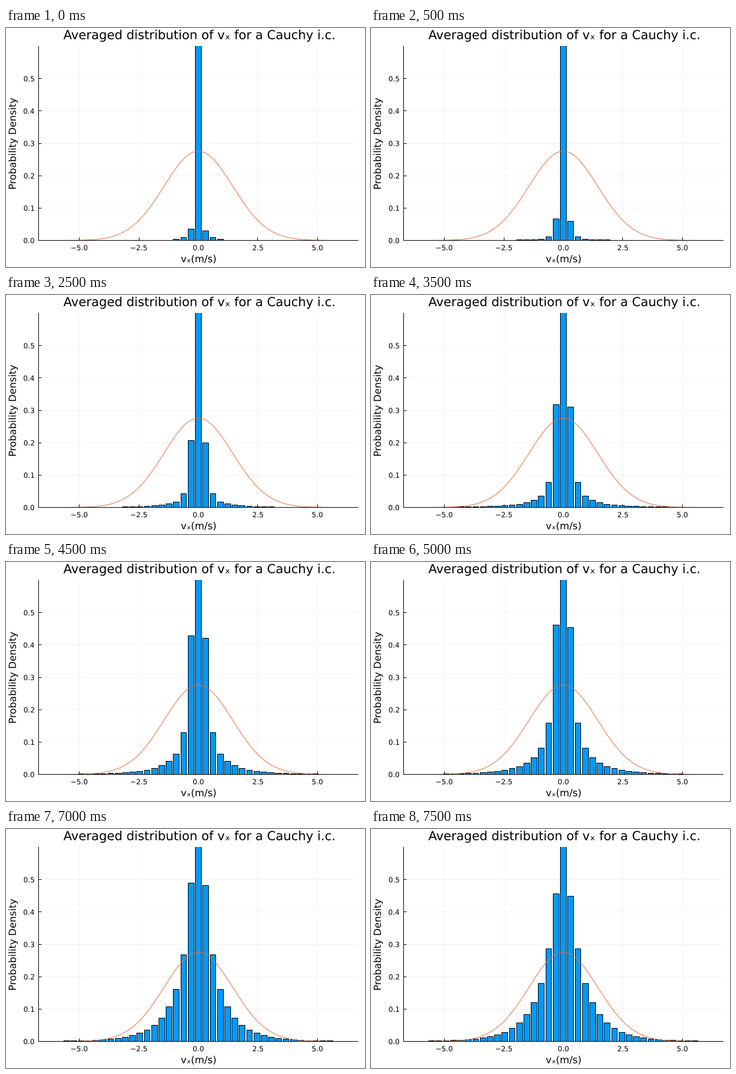
These frames come from a looping animation (600x400 px, 8000 ms). A matplotlib script:

```python
import numpy as np
import matplotlib.pyplot as plt
from matplotlib.animation import FuncAnimation
from matplotlib.patches import PathPatch
from matplotlib.textpath import TextPath
from matplotlib.transforms import Affine2D

W, H, DPI = 600, 400, 100
FRAMES, INTERVAL = 16, 500
LEFT, RIGHT, TOP, BOTTOM = 54.4, 587.6, 30.1, 355.1
MID_X, MID_Y = (LEFT + RIGHT) / 2, (TOP + BOTTOM) / 2
X_MAX, Y_MAX = 6.7, 0.6
STEP = 0.307           # bin spacing
SIGMA = 1.445          # width of the thermal curve
COUNT = 0.003          # density of one sample in a single run
PX = 72 / DPI          # one pixel in points
BINS = np.arange(-19, 20)


def heights(step):
    """Histogram after averaging step + 1 runs."""
    k = np.abs(BINS)
    first = np.interp(step, [0, 3, 5, 9, 11, 12.5, 14, 15],
                      [.033, .126, .203, .425, .49, .505, .486, .452])
    second = .34 / (1 + np.exp(-.36 * (step - 10.35)))
    # Stretched exponential tail, flattening as the runs relax.
    rate = 1.11 - .043 * step
    power = .6 + .0013 * step**2
    h = second * np.exp(-rate * np.maximum(k - 2, 0) ** power)
    h = np.where(k == 1, first - .0037 * BINS, h)
    h[k == 0] = 1
    unit = COUNT / (step + 1)
    return np.round(h / unit) * unit


fig = plt.figure(figsize=(W / DPI, H / DPI), dpi=DPI, facecolor="white")
ax = fig.add_axes([LEFT / W, 1 - BOTTOM / H,
                   (RIGHT - LEFT) / W, (BOTTOM - TOP) / H])
ax.set(xlim=(-X_MAX, X_MAX), ylim=(0, Y_MAX),
       xticks=np.arange(-5, 5.1, 2.5), yticks=np.arange(0, .51, .1))
ax.set_axisbelow(True)
ax.grid(color="black", alpha=.05, lw=PX)
ax.tick_params(direction="in", length=5 * PX, width=PX,
               labelbottom=False, labelleft=False)
for name, spine in ax.spines.items():
    spine.set_visible(name in ("left", "bottom"))
    spine.set_linewidth(PX)
    spine.set_zorder(5)


def label(x, y, text, size, anchor=.5, angle=0):
    """Outline text; anchor 0..1 is the point of its width put at pixel x, y."""
    path = TextPath((0, 0), text, size=size)
    box = path.get_extents()
    place = (Affine2D().translate(-box.x0 - anchor * box.width, 0)
             .rotate_deg(angle).translate(x, H - y))
    fig.add_artist(PathPatch(place.transform_path(path), color="black", lw=0,
                             transform=Affine2D()))


label(322.3, 18.7, "Averaged distribution of vₓ for a Cauchy i.c.", 20.83)
label(MID_X + .5, 392, "vₓ(m/s)", 16.37)
label(16.5, MID_Y + .5, "Probability Density", 16.37, angle=90)
for x in ax.get_xticks():
    px = MID_X + .5 + x / X_MAX * (RIGHT - LEFT) / 2
    label(px, 372, f"{x:.1f}".replace("-", "−"), 11.9)
for y in ax.get_yticks():
    py = BOTTOM - y / Y_MAX * (BOTTOM - TOP)
    label(47, py + 5, f"{y:.1f}", 11.9, anchor=1)

bars = ax.bar(BINS * STEP, heights(0), width=.8 * STEP, color="#009afa",
              edgecolor="black", lw=PX, zorder=3)
xs = np.linspace(-X_MAX, X_MAX, 400)
# Half a pixel right and down, onto the pixel centres the bars snap to.
ax.plot(xs, np.exp(-xs**2 / (2 * SIGMA**2)) / (SIGMA * np.sqrt(2 * np.pi)),
        color="#e26f46", lw=PX, zorder=4,
        transform=ax.transData + Affine2D().translate(.5, -.5))


def draw(step):
    for bar, h in zip(bars, heights(step)):
        bar.set_height(h)
    return bars.patches


anim = FuncAnimation(fig, draw, frames=FRAMES, interval=INTERVAL,
                     repeat=True, repeat_delay=0)
plt.show()
```
